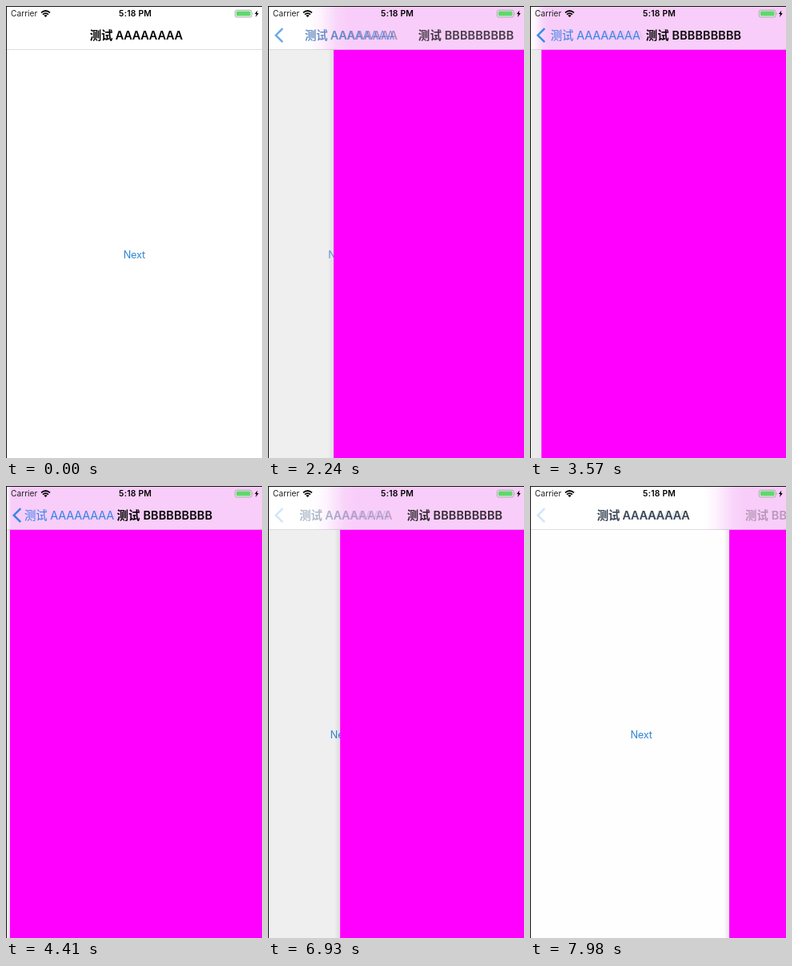
An HTML page that plays this animation: 320 px wide and 566 px high, repeating every 8 s.

```html
<!DOCTYPE html>
<html lang="zh">
<head>
<meta charset="utf-8">
<title>Push and pop</title>
<style>
  html, body { margin: 0; width: 100%; height: 100%; overflow: hidden; background: #fff; }
  svg { display: block; width: 100vw; height: 100vh; }
  text { font-family: Inter, "Noto Sans CJK SC", "Noto Sans CJK", sans-serif; white-space: pre; }
  .title { font-size: 14.46px; font-weight: 600; }
  .back { font-size: 14.46px; letter-spacing: -.2px; fill: #2f83ea; }
</style>
</head>
<body>
<svg viewBox="0 0 320 566">
  <defs>
    <linearGradient id="blur" gradientUnits="userSpaceOnUse" y1="0" y2="0">
      <stop offset="0" stop-color="#f8cdf9" stop-opacity="0"/>
      <stop offset=".3" stop-color="#f8cdf9" stop-opacity=".25"/>
      <stop offset=".7" stop-color="#f8cdf9" stop-opacity=".85"/>
      <stop offset="1" stop-color="#f8cdf9"/>
    </linearGradient>
    <linearGradient id="shade">
      <stop offset="0" stop-opacity="0"/>
      <stop offset="1" stop-opacity=".1"/>
    </linearGradient>
  </defs>

  <rect id="firstPage" width="320" height="566"/>
  <text id="next" y="316" font-size="12.76" letter-spacing="-.2" fill="#2f86d2">Next</text>
  <g id="secondPage">
    <rect id="shadow" x="-7" y="55" width="7" height="511" fill="url(#shade)"/>
    <rect y="55" width="320" height="511" fill="#f0f"/>
  </g>

  <rect width="320" height="55" fill="#fff"/>
  <rect id="tint" width="320" height="55" fill="url(#blur)"/>
  <rect y="54" width="320" height="1" fill-opacity=".13"/>
  <path id="chevron" d="M18.3 28.2 9.8 36.7 18.3 45.2" fill="none" stroke="#2f86e6" stroke-width="2.5"/>
  <text id="titleA" class="title" y="41.8" letter-spacing="-.2">测试 AAAAAAAA</text>
  <text id="backA" class="back" y="41.8">测试 AAAAAAAA</text>
  <text id="titleB" class="title" y="41.8" letter-spacing=".1">测试 BBBBBBBBB</text>

  <g id="statusBar">
    <text x="6" y="13.2" font-size="10.2" fill="#222">Carrier</text>
    <g fill="none" stroke="#000" stroke-width="1.8">
      <path d="M44 8.4Q49.5 3.6 55 8.4M46 10.6Q49.5 7.6 53 10.6"/>
    </g>
    <path d="M47.4 11.9Q49.5 10.3 51.6 11.9L49.5 14Z"/>
    <text x="161.6" y="13.2" font-size="10.4" font-weight="600" letter-spacing=".2" text-anchor="middle">5:18 PM</text>
    <rect x="286.4" y="5.2" width="20.6" height="8.8" rx="2" fill="#fff" fill-opacity=".6" stroke="#999" stroke-width=".8"/>
    <rect x="287.8" y="6.6" width="17.8" height="6" rx="1" fill="#5fd86b"/>
    <path d="M308 8.2q1.4 1.4 0 2.8z" fill="#999"/>
    <path d="M314.4 5.4 310.9 10h2l-.9 3.9 3.8-5h-2.1z"/>
  </g>
  <path d="M0 .5H320M.5 0V566" stroke="#151515" fill="none"/>
</svg>
<script>
const LOOP = 8000, TOUCH = 70, PUSH = 692, SETTLED = 4900, BACK_TOUCH = 6300, POP = 6327;
const RATE = 1.724 / 1000, BAR_DELAY = 108, WIDTH = 319;
const el = id => document.getElementById(id);
const set = (id, attrs) => {
  for (const key in attrs) el(id).setAttribute(key, attrs[key]);
};
const clamp = v => Math.max(0, Math.min(1, v));

// Critically damped spring: remaining distance, from 1 to 0.
const spring = ms => {
  const u = Math.max(0, ms) * RATE;
  return (1 + u) * Math.exp(-u);
};

// How far the second screen is in, from 0 to 1.
function shown(t, delay) {
  if (t >= POP) return spring(t - POP - delay);
  return t >= SETTLED ? 1 : 1 - spring(t - PUSH - delay);
}

function draw(t) {
  const page = shown(t, 0), bar = shown(t, BAR_DELAY);
  const popping = t >= POP;
  const edge = 1 + WIDTH * (1 - page);

  const dim = popping ? Math.min(20, 30 * page * page) : 21 * page;
  const gray = Math.round(255 - dim);
  set("firstPage", { fill: `rgb(${gray},${gray},${gray})` });
  set("next", {
    x: 146.7 - .3 * WIDTH * page,
    opacity: t < TOUCH || popping ? 1 : .25 + .75 * bar
  });
  set("secondPage", { transform: `translate(${edge} 0)` });
  set("shadow", { opacity: page > 0 ? clamp((1 - page) * 3) : 0 });

  const spread = clamp(Math.min(edge - 1, 320 - edge) / 32);
  set("blur", { x1: edge - 32 * spread - .01, x2: edge + 20 * spread });
  set("tint", { opacity: page > 0 ? 1 : 0 });

  const labelX = 104.8 - 83 * bar;
  const backOpacity = t >= BACK_TOUCH ? .22 : bar;
  set("chevron", { opacity: backOpacity });
  set("titleA", { x: labelX, opacity: 1 - bar });
  set("backA", { x: labelX, opacity: backOpacity });
  set("titleB", { x: 136 + 178.5 * (1 - bar), opacity: bar });
}

const start = performance.now();
function tick() {
  draw((performance.now() - start) % LOOP);
  requestAnimationFrame(tick);
}
tick();
</script>
</body>
</html>
```
